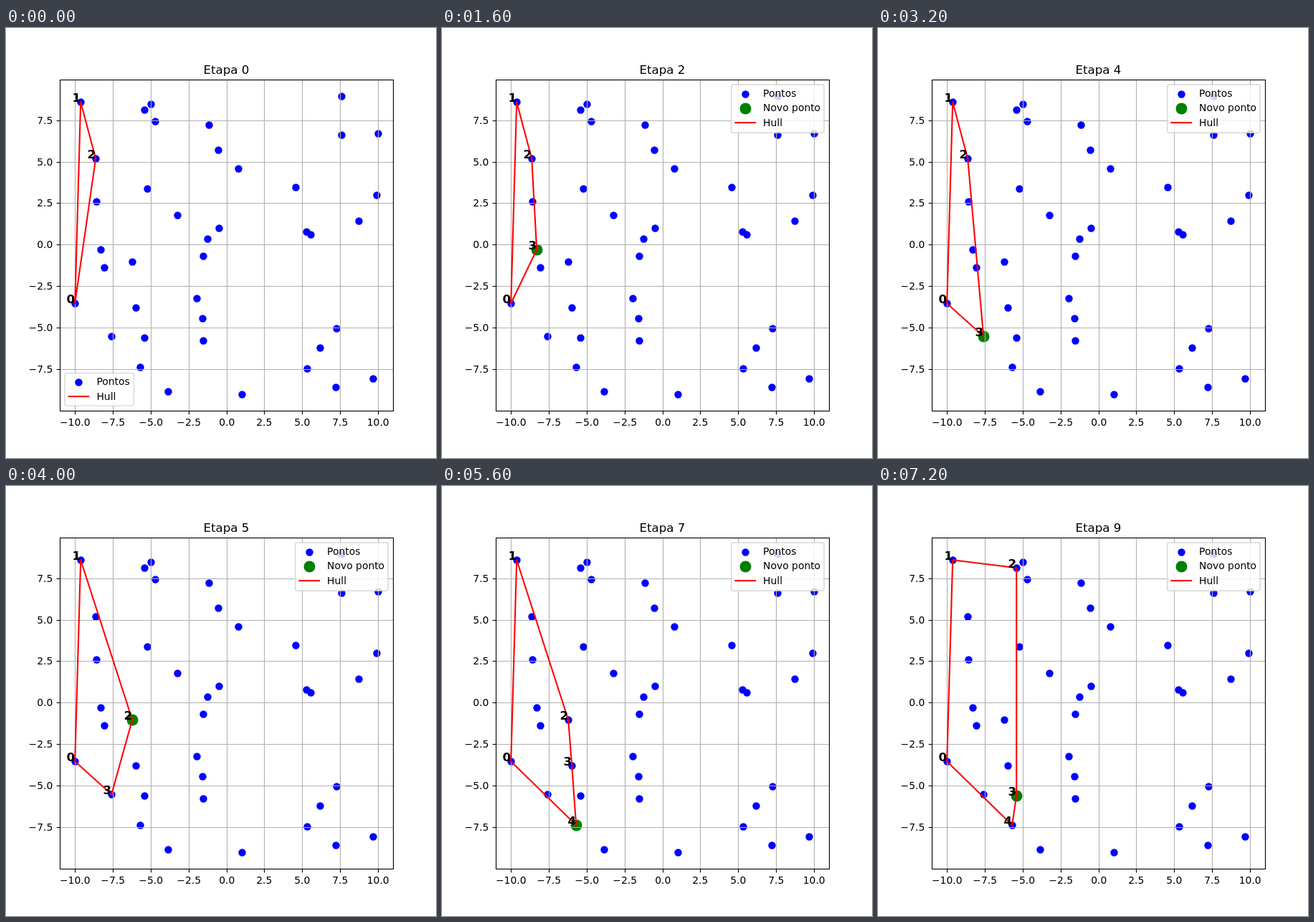
These frames come from a looping animation (600 px wide and 600 px high, 8 s). An HTML page with a canvas:

```html
<!DOCTYPE html>
<html lang="pt">
<head>
<meta charset="utf-8">
<title>Etapas</title>
<style>
html, body { margin: 0; width: 100%; height: 100%; overflow: hidden; background: #fff; }
canvas { display: block; }
</style>
</head>
<body>
<canvas id="stage" width="600" height="600"></canvas>
<script>
const ctx = document.getElementById('stage').getContext('2d');
const STEP = 800, STAGES = 10;
const LEFT = 75, RIGHT = 540, TOP = 72, BOTTOM = 534;
const THIN = 1.11;

// Sorted by x: the hull grows from left to right.
const points = [
  [96, 384], [104, 103], [125, 182], [126, 242], [132, 309], [137, 334], [147, 430],
  [176, 326], [181, 390], [187, 473], [193, 114], [193, 432], [197, 224], [202, 106],
  [208, 130], [226, 507], [239, 261], [266, 377], [274, 405], [275, 318], [275, 436],
  [281, 294], [283, 135], [296, 170], [297, 279], [324, 196], [329, 511], [404, 222],
  [419, 284], [420, 475], [425, 288], [438, 446], [460, 501], [461, 419], [468, 95],
  [468, 149], [492, 269], [512, 489], [517, 233], [519, 147]
];

const tickValues = n => Array.from({ length: 2 * n + 1 }, (_, i) => (i - n) * 2.5);
const xTicks = tickValues(4).map(v => [v, Math.round(307.6 + v * 21.14) + 0.5]);
const yTicks = tickValues(3).map(v => [v, Math.round(302.4 - v * 23.16) + 0.5]);
const tickLabel = v => v.toFixed(1).replace('-', '\u2212');

function line(x1, y1, x2, y2, color, width) {
  ctx.strokeStyle = color;
  ctx.lineWidth = width;
  ctx.beginPath();
  ctx.moveTo(x1, y1);
  ctx.lineTo(x2, y2);
  ctx.stroke();
}

function dot([x, y], color = '#00f', radius = 5.2) {
  ctx.fillStyle = color;
  ctx.beginPath();
  ctx.arc(x + 0.5, y + 0.5, radius, 0, 2 * Math.PI);
  ctx.fill();
}

const newDot = p => dot(p, '#008000', 8);

function text(str, x, y, align = 'left', size = 13.89, weight = '') {
  ctx.font = `${weight} ${size}px "DejaVu Sans", sans-serif`;
  ctx.textAlign = align;
  ctx.fillStyle = '#000';
  ctx.fillText(str, x, y);
}

function chain(list) {
  const out = [];
  for (const p of list) {
    while (out.length > 1) {
      const [a, b] = out.slice(-2);
      if ((b[0] - a[0]) * (p[1] - b[1]) - (b[1] - a[1]) * (p[0] - b[0]) > 0) break;
      out.pop();
    }
    out.push(p);
  }
  return out.slice(0, -1);
}

const hullOf = list => [...chain(list), ...chain([...list].reverse())];

function drawHull(hull) {
  ctx.strokeStyle = '#f00';
  ctx.lineWidth = 2.08;
  ctx.lineJoin = 'round';
  ctx.beginPath();
  hull.forEach(([x, y]) => ctx.lineTo(x + 0.2, y + 0.2));
  ctx.closePath();
  ctx.stroke();
  hull.forEach(([x, y], i) => text(i, x + 0.2, y, 'right', 16.67, 'bold'));
}

function drawAxes() {
  for (const [, x] of xTicks) line(x, TOP, x, BOTTOM, '#b0b0b0', THIN);
  for (const [, y] of yTicks) line(LEFT, y, RIGHT, y, '#b0b0b0', THIN);
  for (const [v, x] of xTicks) {
    line(x, BOTTOM + 0.5, x, BOTTOM + 5.4, '#000', THIN);
    text(tickLabel(v), x - 0.3, 555, 'center');
  }
  for (const [v, y] of yTicks) {
    line(LEFT - 4.4, y, LEFT + 0.5, y, '#000', THIN);
    text(tickLabel(v), 65.3, y + 4.5, 'right');
  }
}

function drawFrame() {
  ctx.strokeStyle = '#000';
  ctx.lineWidth = THIN;
  ctx.lineJoin = 'miter';
  ctx.strokeRect(LEFT + 0.5, TOP + 0.5, RIGHT - LEFT, BOTTOM - TOP);
}

function legend(x, y, width, height, entries) {
  ctx.beginPath();
  ctx.roundRect(x, y, width, height, 2.78);
  ctx.fillStyle = 'rgba(255,255,255,0.8)';
  ctx.fill();
  ctx.strokeStyle = 'rgba(204,204,204,0.8)';
  ctx.lineWidth = 1.39;
  ctx.stroke();
  entries.forEach(([label, mark], i) => {
    const row = y + 12.6 + i * 20.4;
    mark([Math.floor(x + 19.4), Math.round(row)], x);
    text(label, x + 44.4, Math.round(row + 4.4));
  });
}

const hullMark = ([, y], x) => line(x + 4.6, y + 0.1, x + 34.4, y + 0.1, '#f00', 2.08);

function draw(stage) {
  const seen = points.slice(0, stage + 3);
  ctx.fillStyle = '#fff';
  ctx.fillRect(0, 0, 600, 600);
  points.forEach(p => dot(p));
  if (stage) newDot(seen[seen.length - 1]);
  drawAxes();
  drawHull(hullOf(seen));
  drawFrame();
  text(`Etapa ${stage}`, 307.5, 64, 'center', 16.67);
  if (stage) {
    legend(403.7, 79, 129.4, 67.3, [['Pontos', dotMark], ['Novo ponto', newDot], ['Hull', hullMark]]);
  } else {
    legend(82, 481.4, 96.4, 45.7, [['Pontos', dotMark], ['Hull', hullMark]]);
  }
}

function dotMark(p) { dot(p); }

function tick() {
  draw(Math.floor(performance.now() / STEP) % STAGES);
  requestAnimationFrame(tick);
}
tick();
</script>
</body>
</html>
```
